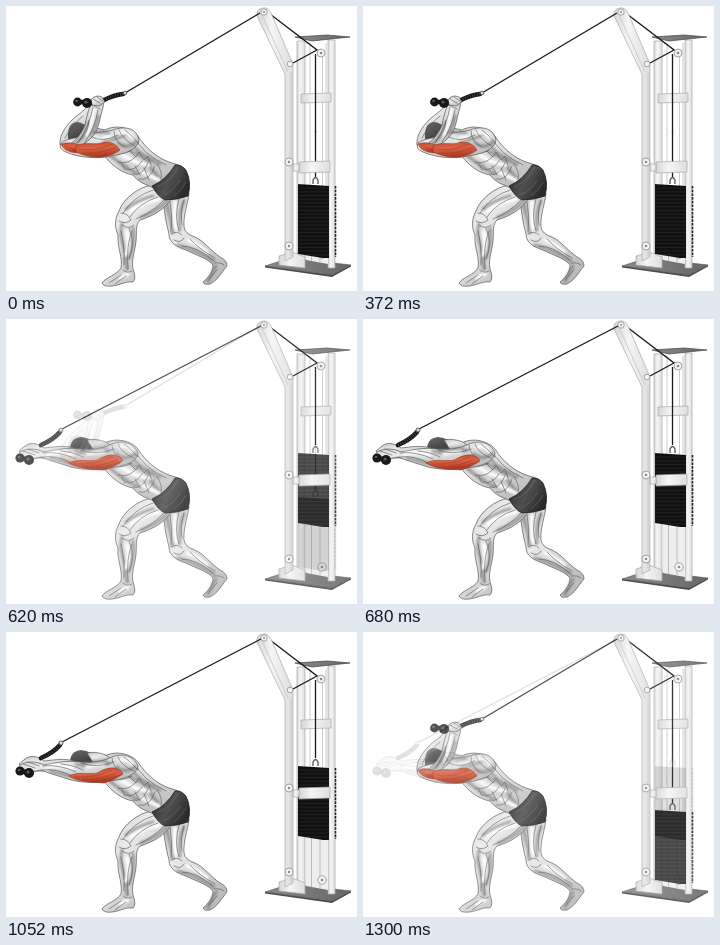
Animation of 351x285 px, one loop 1.36 s. Source, as an HTML page without scripts:

```html
<!DOCTYPE html>
<html lang="en">
<head>
<meta charset="utf-8">
<title>Overhead cable triceps extension</title>
<style>
  html, body { margin: 0; width: 100%; height: 100%; overflow: hidden; background: #fff; }
  svg { display: block; width: 100vw; height: 100vh; }
  .steel { fill: url(#steel); stroke: #aaa; stroke-width: .7; }
  .bolt { fill: #f4f4f4; stroke: #999; stroke-width: .9; }
  .skin { fill: url(#skin); stroke: #555; stroke-width: .7; stroke-linejoin: round; }
  .red { fill: url(#red); stroke: #8b3020; stroke-width: .5; }
  .fiber { fill: none; stroke: #8f2d18; stroke-width: .5; opacity: .7; }
  .soft { fill: none; stroke: #666; stroke-width: 3.2; stroke-linecap: round; opacity: .55; filter: url(#blur); }
  .glow { fill: none; stroke: #fff; stroke-width: 3.5; stroke-linecap: round; filter: url(#blur); }
  .line { fill: none; stroke: #555; stroke-width: .6; stroke-linecap: round; }
  .cable { fill: none; stroke: #181818; stroke-width: 1.3; }
  .rope { fill: none; stroke: #151515; stroke-width: 4.6; stroke-linecap: round; }
  .twist { fill: none; stroke: #555; stroke-width: 3; stroke-dasharray: .7 1.8; }
  .hair { fill: url(#hair); }
  .knob { fill: #181818; }
  .shine { fill: #5c5c5c; }

  /* The bent pose lies over the stretched one and dissolves in hard steps. */
  #bent { animation: swap 1360ms step-end infinite; }
  #scene { animation: pale 1360ms step-end infinite; }
  @keyframes swap {
    0% { opacity: 1; }
    45.588% { opacity: .15; }
    50% { opacity: 0; }
    95.588% { opacity: .85; }
    100% { opacity: 1; }
  }
  @keyframes pale {
    0%, 50%, 100% { opacity: 1; }
    45.588%, 95.588% { opacity: .88; }
  }
</style>
</head>
<body>
<svg viewBox="0 0 351 285" preserveAspectRatio="none">
  <defs>
    <linearGradient id="steel">
      <stop offset="0" stop-color="#d5d5d5"/>
      <stop offset=".4" stop-color="#f5f5f5"/>
      <stop offset="1" stop-color="#dedede"/>
    </linearGradient>
    <linearGradient id="skin" x1="0" y1="0" x2=".8" y2="1">
      <stop offset="0" stop-color="#bcbcbc"/>
      <stop offset=".35" stop-color="#ebebeb"/>
      <stop offset="1" stop-color="#b8b8b8"/>
    </linearGradient>
    <linearGradient id="hair" x2=".6" y2="1">
      <stop offset="0" stop-color="#6a6a6a"/>
      <stop offset="1" stop-color="#333"/>
    </linearGradient>
    <linearGradient id="red" x2=".2" y2="1">
      <stop offset="0" stop-color="#c24a2f"/>
      <stop offset=".45" stop-color="#dd6245"/>
      <stop offset="1" stop-color="#a93a20"/>
    </linearGradient>
    <linearGradient id="cloth" x2="1" y2=".5">
      <stop offset="0" stop-color="#262626"/>
      <stop offset=".55" stop-color="#505050"/>
      <stop offset="1" stop-color="#2b2b2b"/>
    </linearGradient>
    <linearGradient id="plate">
      <stop offset="0" stop-color="#8a8a8a"/>
      <stop offset="1" stop-color="#666"/>
    </linearGradient>
    <pattern id="discs" width="40" height="3.7" patternUnits="userSpaceOnUse">
      <rect width="40" height="3.7" fill="#101010"/>
      <path d="M0 .4H40" stroke="#2b2b2b" stroke-width=".7"/>
    </pattern>
    <filter id="blur" x="-50%" y="-50%" width="200%" height="200%"><feGaussianBlur stdDeviation="1.1"/></filter>

    <g id="frame">
      <path d="M259 260L284 252L345 259L326 269Z" fill="url(#plate)" stroke="#555" stroke-width=".6"/>
      <path d="M259 260L326 269L345 259V260.500L326 271L259 261.500Z" fill="#4c4c4c"/>
      <path class="steel" d="M291 35H299V254H291Z"/>
      <path class="steel" d="M322 34H329V262H322Z"/>
      <path d="M301 37H304V254M316.500 50V256M320 37V256" stroke="#ccc" fill="none"/>
      <path d="M300 206H322V258L300 254Z" fill="#eee"/>
      <path d="M305.500 206V255M314 206V257" stroke="#bbb" fill="none"/>
      <path class="steel" d="M295 88L325 87V96L295 97Z"/>
      <path d="M289 31L321 29L344 31L306 35Z" fill="url(#plate)" stroke="#444" stroke-width=".7"/>
      <path class="cable" d="M260 5L311 44L287 57"/>
      <path class="cable" d="M309.500 48V126" stroke-width="1"/>
      <g class="bolt">
        <circle cx="315" cy="47" r="4"/>
        <circle cx="316" cy="248" r="4.200"/>
      </g>
      <g fill="#888">
        <circle cx="315" cy="47" r="1.300"/><circle cx="316" cy="248" r="1.300"/>
      </g>
    </g>

    <g id="front">
      <path class="steel" d="M293 156L324 155V166L293 167Z"/>
      <path class="steel" d="M273 250L286 246L299 251V262L273 259Z"/>
      <path class="steel" d="M279 68L251 10Q250 3 257 2Q262 1 265 7L287 58V251L279 255Z"/>
      <path d="M285 66V250M256 9L282 66" fill="none" stroke="#c4c4c4" stroke-width=".8"/>
      <path class="steel" d="M287 158H293V165H287Z"/>
      <g class="bolt">
        <circle cx="258" cy="6" r="3.200"/>
        <circle cx="284" cy="58" r="2.800"/>
        <circle cx="283" cy="156" r="4"/>
        <circle cx="283" cy="240" r="4"/>
      </g>
      <g fill="#888">
        <circle cx="258" cy="6" r="1"/><circle cx="283" cy="156" r="1.200"/>
        <circle cx="283" cy="240" r="1.200"/>
      </g>
    </g>

    <g id="stack">
      <path d="M292 0L323 2V74L317 74L292 70Z" fill="url(#discs)"/>
      <path d="M329.500 2V73" stroke="#222" stroke-width="1.600" stroke-dasharray="2.600 1.100"/>
      <path d="M307 0V-4Q309.500 -9 312 -4V0" fill="none" stroke="#555" stroke-width="1.300"/>
    </g>

    <g id="body">
      <!-- rear leg -->
      <path class="skin" d="M157 190C158 206 160 216 163 228C163 237 171 241 180 244C192 250 203 253 207 259C207 266 203 271 197 276Q198 279 204 278C212 274 215 267 221 260Q221 254 214 251C204 244 198 235 189 231Q179 228 178 221C177 209 182 198 183 187Z"/>
      <path class="soft" d="M161 199Q165 214 167 227M178 195Q172 208 174 224M172 239Q190 244 208 255M210 260L202 275"/>
      <path class="glow" d="M169 196Q168 212 170 222M182 234Q192 238 201 246"/>
      <path class="line" d="M164 195Q167 211 165 226M173 193Q168 211 173 225M178 194Q174 207 176 219M165 228Q171 224 176 229M168 234Q175 238 178 232M176 240Q190 240 207 254M184 233Q193 243 209 252M208 257Q214 256 218 259M203 273L211 264"/>

      <!-- front leg -->
      <path class="skin" d="M146 179C132 181 117 193 113 205C108 214 109 222 112 229C111 241 117 252 115 262C111 269 100 271 96 277Q98 281 106 280C115 279 119 275 127 276Q130 273 128 266C124 256 129 246 130 235C131 225 129 219 134 214C147 210 160 203 166 191Z"/>
      <path class="soft" d="M120 203Q132 194 147 190M135 211Q150 206 161 195M116 218Q113 228 118 242L121 263M127 222Q129 235 123 252"/>
      <path class="glow" d="M125 205Q139 195 153 193M121 226Q124 237 120 249M114 272L122 268"/>
      <path class="line" d="M147 184Q128 190 117 207M152 191Q133 197 124 211M158 194Q146 207 130 213M115 207Q122 207 125 214Q119 219 113 215M116 219Q123 224 128 219M115 225Q119 241 118 259M123 222Q130 237 123 253M126 225Q120 239 122 263M117 264Q121 268 126 265M103 277L115 269M109 278L120 270"/>

      <!-- trunk -->
      <path class="skin" d="M70 127C79 119 90 122 99 124C110 118 125 122 132 130C140 143 152 152 163 156Q172 158 177 162L151 183C140 179 132 176 127 169C116 167 106 160 98 149L83 145Z"/>
      <path class="soft" d="M104 130Q121 146 154 158M105 149Q117 162 131 167M104 150Q114 157 121 161M138 150Q145 163 153 172M126 138Q134 149 148 154"/>
      <path class="glow" d="M114 147Q126 157 143 159M136 166Q146 171 153 174M109 127Q119 123 127 131"/>
      <path class="line" d="M97 125Q111 130 118 140M128 130Q136 148 160 159M104 147Q115 150 126 144M112 156Q123 159 130 150M120 163Q129 166 136 155M127 168Q136 171 142 157M133 173Q143 176 149 160M123 144L130 151L133 146L138 154L142 150L145 159M116 158L119 164M129 160L134 169M138 162L143 174M151 158Q157 166 155 173M105 129Q119 131 128 141M111 126Q123 126 132 138"/>

      <!-- shorts -->
      <path d="M146 180Q160 174 169 159Q175 158 180 164Q186 176 182 190Q171 194 159 194Q152 191 146 180Z" fill="url(#cloth)" stroke="#171717" stroke-width=".7"/>
      <path d="M151 181Q166 174 172 161M158 189Q168 184 174 174M168 190Q176 184 180 176" fill="none" stroke="#777" stroke-width=".8" opacity=".65"/>
    </g>
  </defs>

  <g id="scene">
    <g id="stretched">
      <rect width="351" height="285" fill="#fff"/>
      <use href="#frame"/>
      <use href="#stack" y="134"/>
      <use href="#front"/>
      <path class="cable" d="M255 7L56 110"/>
      <use href="#body"/>

      <path class="hair" d="M64 131Q64 119 75 118Q86 119 92 127L84 134H66Z"/>
      <path class="skin" d="M81 121Q89 119 100 123L108 130L88 132Z"/>
      <path class="skin" d="M68 129C58 126 48 128 38 129C32 125 26 122 19 127L13 132L20 139L70 139Z"/>
      <path class="skin" d="M132 134C128 123 116 121 106 125C96 130 84 131 74 130C61 128 49 131 38 133C30 129 21 129 14 133Q11 137 15 139L25 140L35 138C45 142 56 145 65 148C78 151 92 151 102 149C116 148 130 144 132 134Z"/>
      <path class="soft" d="M44 139Q57 142 68 145M70 132Q85 137 104 131M111 135Q119 142 129 135M76 131L100 129"/>
      <path class="glow" d="M42 135Q55 132 67 136M81 135L98 133M114 128Q122 126 126 132"/>
      <path class="line" d="M37 134Q53 132 70 140M36 138Q52 136 65 144M55 132Q67 133 77 138M75 131Q90 137 108 130M106 126Q106 135 116 140M112 125Q115 134 128 139M118 125Q124 129 131 137M17 132L29 136M14 136L25 139M22 130L33 134"/>
      <path class="red" d="M63 144C73 139 82 143 91 141Q101 135 109 136Q116 138 117 142C112 145 106 149 98 151C88 150 74 151 63 144Z"/>
      <path class="fiber" d="M68 145Q90 146 106 138M76 148Q95 148 112 140M86 149Q100 149 115 143"/>

      <path class="rope" d="M54 113Q47 121 35 126"/>
      <path class="twist" d="M54 113Q47 121 35 126"/>
      <circle cx="55" cy="111" r="2" fill="#ddd" stroke="#444" stroke-width=".8"/>
      <path class="rope" d="M14 139L23 141"/>
      <circle class="knob" cx="14" cy="139" r="4.600"/>
      <circle class="knob" cx="23" cy="141" r="5"/>
      <circle class="shine" cx="13" cy="138" r="1.300"/>
      <circle class="shine" cx="22" cy="140" r="1.500"/>
    </g>

    <g id="bent">
      <rect width="351" height="285" fill="#fff"/>
      <use href="#frame"/>
      <path class="cable" d="M309.500 125V171" stroke-width="1"/>
      <use href="#stack" y="178"/>
      <use href="#front"/>
      <path class="cable" d="M254 7L119 87"/>
      <use href="#body"/>

      <path class="skin" d="M54 139C53 130 59 121 66 114C71 109 77 106 83 99L92 102L82 119L68 139Z"/>
      <path class="hair" d="M62 132Q61 118 70 116Q79 116 83 125L79 139H66Z"/>
      <path class="skin" d="M133 134C131 123 121 120 110 123C100 127 91 125 83 129C73 132 61 132 55 137Q52 143 60 146C73 152 92 153 105 150C119 148 131 144 133 134Z"/>
      <path class="skin" d="M60 140C68 137 75 129 79 119C81 109 83 101 87 94Q92 89 96 93Q99 99 96 105C93 115 93 125 84 133C77 140 69 143 60 140Z"/>
      <path class="soft" d="M82 117Q80 130 69 138M92 110Q90 123 83 129M94 132Q106 137 120 128M112 137Q121 144 130 136M84 126L103 127"/>
      <path class="glow" d="M88 104Q86 119 81 129M114 127Q123 125 127 132M92 133L104 131"/>
      <path class="line" d="M87 101Q84 119 72 137M92 104Q89 122 79 136M83 114Q83 126 73 135M59 132Q65 120 77 110M86 131Q97 137 112 129M108 125Q108 136 119 141M113 124Q117 134 129 140M119 124Q125 128 132 137M88 95L95 99M86 99L94 103"/>
      <path class="red" d="M55 138Q63 135 73 139Q75 143 71 147Q58 146 55 138Z"/>
      <path class="red" d="M70 140C78 135 90 140 98 136Q109 135 114 144Q108 149 97 151C86 152 76 149 70 146Z"/>
      <path class="fiber" d="M58 140L70 144M72 143Q88 146 106 138M76 147Q92 149 110 141"/>

      <path class="rope" d="M117 88Q108 89 98 94"/>
      <path class="twist" d="M117 88Q108 89 98 94"/>
      <circle cx="119" cy="87" r="1.800" fill="#ddd" stroke="#444" stroke-width=".8"/>
      <path class="rope" d="M72 96L89 96M82 98L91 95"/>
      <path class="skin" d="M85 94Q89 88 96 91L99 96L93 100L86 99Z"/>
      <path class="line" d="M87 93L94 97M91 91L97 95"/>
      <circle class="knob" cx="71.500" cy="96" r="4.400"/>
      <circle class="knob" cx="81" cy="97" r="5"/>
      <circle class="shine" cx="70.500" cy="95" r="1.300"/>
      <circle class="shine" cx="80" cy="96" r="1.600"/>
    </g>
  </g>
</svg>
</body>
</html>
```
